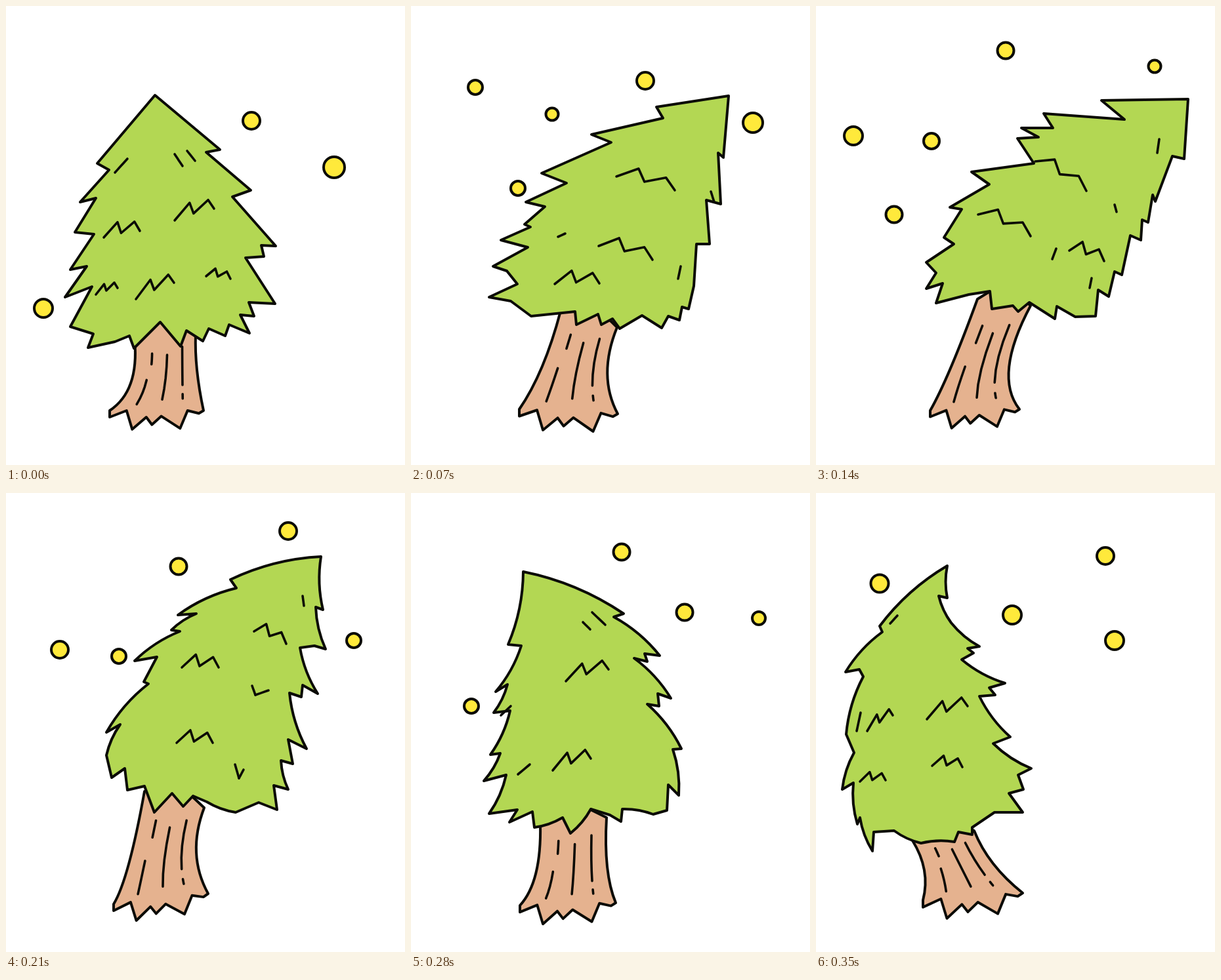
Recreate the animation shown at these times as an HTML page with a canvas. Size 608 by 700 pixels, loop 0.42 s.

```html
<!DOCTYPE html>
<html lang="en">
<head>
<meta charset="utf-8">
<title>Swaying tree</title>
<style>
html, body { margin: 0; width: 100%; height: 100%; overflow: hidden; background: #fff; }
canvas { display: block; }
</style>
</head>
<body>
<canvas id="stage" width="608" height="700"></canvas>
<script>
const STEP = 70;
const INK = '#0b0b06', LEAF = '#b3d753', BARK = '#e5b28f', GLOW = '#ffe93b';

// Shared by all poses: root teeth (across, down) and bark lines (across, from, to).
const ROOTS = [[0, .07], [.18, 0], [.24, .2], [.39, .07], [.45, .15], [.55, .06], [.75, .19], [.83, 0], [.95, .03]];
const GRAIN = [[.28, .17, .3], [.24, .5, .88], [.53, .22, .83], [.78, .15, .66], [.78, .78, .84]];
const ZIGZAG = [[0, 0], [.38, 1], [.48, .1], [.85, .8], [1, 0]];

const ctx = document.getElementById('stage').getContext('2d');
ctx.lineCap = ctx.lineJoin = 'round';
ctx.strokeStyle = INK;

const mix = (a, b, t) => a.map((v, i) => v + (b[i] - v) * t);
const quad = (a, c, b, t) => mix(mix(a, c, t), mix(c, b, t), t);
const chunk = (list, n) => Array.from({ length: list.length / n }, (_, i) => list.slice(i * n, i * n + n));

function paint(path, width, fill) {
  if (fill) {
    ctx.fillStyle = fill;
    ctx.fill(path);
  }
  ctx.lineWidth = width;
  ctx.stroke(path);
}

function line(points, width) {
  const p = new Path2D();
  points.forEach(pt => p.lineTo(...pt));
  paint(p, width);
}

function drawTrunk(flat) {
  const [tl, cl, bl, br, cr, tr] = chunk(flat, 2);
  const p = new Path2D();
  const w = br[0] - bl[0];
  p.moveTo(...tl);
  p.quadraticCurveTo(...cl, ...bl);
  for (const [u, v] of ROOTS) {
    const [x, y] = mix(bl, br, u);
    p.lineTo(x, y + v * w);
  }
  p.lineTo(...br);
  p.quadraticCurveTo(...cr, ...tr);
  p.lineTo((tl[0] + tr[0]) / 2, (tl[1] + tr[1]) / 2 - 30);
  p.closePath();
  paint(p, 4, BARK);
  const at = (u, v) => mix(quad(tl, cl, bl, v), quad(tr, cr, br, v), u);
  for (const [u, from, to] of GRAIN) {
    line([0, .25, .5, .75, 1].map(t => at(u, from + (to - from) * t)), 3.6);
  }
}

// Long edges bow sideways with the wind.
function drawCrown(flat, bow) {
  const pts = chunk(flat, 2);
  const p = new Path2D();
  p.moveTo(...pts[0]);
  pts.forEach((a, i) => {
    const b = pts[(i + 1) % pts.length];
    const dx = b[0] - a[0], dy = b[1] - a[1];
    const k = Math.hypot(dx, dy) > 45 ? bow * Math.sign(dy) : 0;
    p.quadraticCurveTo((a[0] + b[0]) / 2 + k * dy, (a[1] + b[1]) / 2 - k * dx, ...b);
  });
  p.closePath();
  paint(p, 4, LEAF);
}

// Short marks are plain ticks, longer ones become zigzags.
function drawMark([x0, y0, x1, y1]) {
  const len = Math.hypot(x1 - x0, y1 - y0);
  const amp = len > 30 ? Math.min(20, len * .35) : 0;
  line(ZIGZAG.map(([t, up]) => [x0 + (x1 - x0) * t, y0 + (y1 - y0) * t - up * amp]), 3.6);
}

function drawDot([x, y, r]) {
  const p = new Path2D();
  p.arc(x, y, r, 0, 2 * Math.PI);
  paint(p, 4, GLOW);
}

const poses = [];
const pose = (bow, crown, trunk, marks, dots) => poses.push(() => {
  drawTrunk(trunk);
  drawCrown(crown, bow);
  chunk(marks, 4).forEach(drawMark);
  chunk(dots, 3).forEach(drawDot);
});

pose(0,
  [227,136, 326,219, 305,223, 373,281, 345,291, 411,366, 389,365, 393,382, 365,384, 410,454, 370,452,
   378,473, 357,471, 371,499, 340,486, 334,503, 309,492, 300,511, 275,495, 266,519, 235,482, 195,522,
   188,503, 166,512, 125,521, 133,500, 98,489, 131,428, 90,444, 123,397, 98,402, 134,348, 105,345,
   137,293, 113,299, 157,250, 139,240],
  [196,510, 203,587, 158,617, 301,617, 287,552, 289,500],
  [149,353,204,343, 257,327,317,309, 198,447,256,422, 137,440,170,430, 305,412,342,416,
   185,233,166,254, 257,226,269,244, 276,221,288,236],
  [374,175,13, 500,246,16, 57,461,14]);

pose(0,
  [484,137, 476,231, 468,224, 472,302, 450,296, 455,363, 435,363, 431,427, 423,462, 413,459, 409,479,
   392,473, 382,491, 352,472, 318,492, 307,477, 290,486, 285,470, 252,486, 250,466, 183,473, 152,450,
   119,444, 162,424, 146,404, 125,397, 178,368, 137,357, 182,337, 173,333, 204,306, 175,299, 237,270,
   199,255, 305,208, 275,196, 384,171, 374,154],
  [228,465, 203,560, 165,615, 315,622, 284,564, 314,490],
  [313,260,402,281, 286,366,368,387, 219,424,287,423, 457,283,462,299, 411,397,407,416, 224,352,235,347],
  [98,124,11, 215,165,9.5, 357,114,13, 521,178,15, 163,278,11]);

pose(0,
  [567,142, 561,233, 543,229, 517,298, 513,288, 506,330, 497,326, 495,357, 479,350, 466,410, 455,405,
   446,443, 430,433, 426,473, 395,474, 367,458, 364,477, 325,452, 308,466, 300,457, 268,462, 265,435,
   233,440, 183,453, 193,423, 168,431, 183,407, 168,391, 210,363, 195,353, 222,310, 204,307, 264,272,
   237,253, 332,240, 307,202, 339,200, 313,186, 361,186, 347,164, 470,173, 435,144],
  [246,447, 202,568, 174,617, 310,615, 270,564, 327,457],
  [334,237,412,282, 247,318,327,351, 386,373,439,389, 366,370,360,386, 420,415,417,430,
   523,203,520,224, 455,303,458,314],
  [289,68,12.5, 516,92,9.5, 57,198,14, 176,206,12, 119,318,12.5]);

pose(-.1,
  [480,97, 483,178, 472,174, 487,238, 470,233, 448,236, 475,306, 452,293, 450,311, 432,305, 458,390,
   430,376, 437,413, 419,408, 430,452, 408,446, 413,483, 385,472, 350,487, 306,471, 285,462, 270,478,
   253,458, 226,487, 211,447, 185,453, 181,420, 161,434, 153,400, 174,353, 153,365, 217,291, 210,288,
   230,250, 196,256, 265,211, 252,209, 290,184, 262,186, 351,145, 342,132],
  [211,455, 187,589, 164,627, 308,611, 275,551, 302,480],
  [378,211,427,230, 268,266,324,266, 260,381,315,381, 375,294,380,308, 380,308,400,301,
   349,414,355,435, 355,435,362,422, 452,157,454,172],
  [430,58,13, 263,112,12.5, 82,239,13, 172,249,11, 530,225,11]);

pose(.1,
  [171,120, 324,184, 309,189, 379,248, 356,245, 360,257, 340,252, 396,313, 376,306, 378,325, 360,322,
   412,390, 399,391, 408,461, 392,445, 390,484, 369,490, 322,482, 320,501, 303,491, 274,482, 243,519,
   231,495, 188,510, 185,486, 150,502, 162,483, 119,489, 145,430, 111,439, 136,397, 121,399, 151,332,
   126,335, 147,292, 129,303, 168,233, 148,231],
  [197,505, 199,593, 166,629, 312,625, 293,580, 298,495],
  [236,287,301,269, 216,423,274,405, 276,182,296,201, 262,197,273,208, 152,325,137,339, 163,429,181,414],
  [321,90,12.5, 417,182,12.5, 530,191,10, 92,325,11]);

pose(-.1,
  [200,111, 200,160, 187,157, 206,198, 249,234, 231,237, 240,244, 222,254, 288,290, 264,297, 273,308,
   249,310, 296,372, 270,382, 328,420, 308,430, 316,452, 294,458, 315,487, 272,487, 238,510, 238,521,
   217,517, 211,532, 160,534, 119,515, 88,517, 86,546, 67,495, 63,505, 57,442, 40,452, 58,396, 46,368,
   72,280, 66,269, 45,273, 101,212, 97,203],
  [147,530, 175,575, 163,621, 315,610, 262,568, 241,515],
  [169,345,231,325, 78,363,117,339, 177,416,223,418, 67,440,106,438, 124,187,113,199, 68,335,62,363],
  [97,138,13.5, 441,96,13, 299,186,14, 455,225,14]);

let start;
function tick(now) {
  start ??= now;
  ctx.clearRect(0, 0, 608, 700);
  poses[Math.floor((now - start) / STEP) % poses.length]();
  requestAnimationFrame(tick);
}
poses[0]();
requestAnimationFrame(tick);
</script>
</body>
</html>
```
